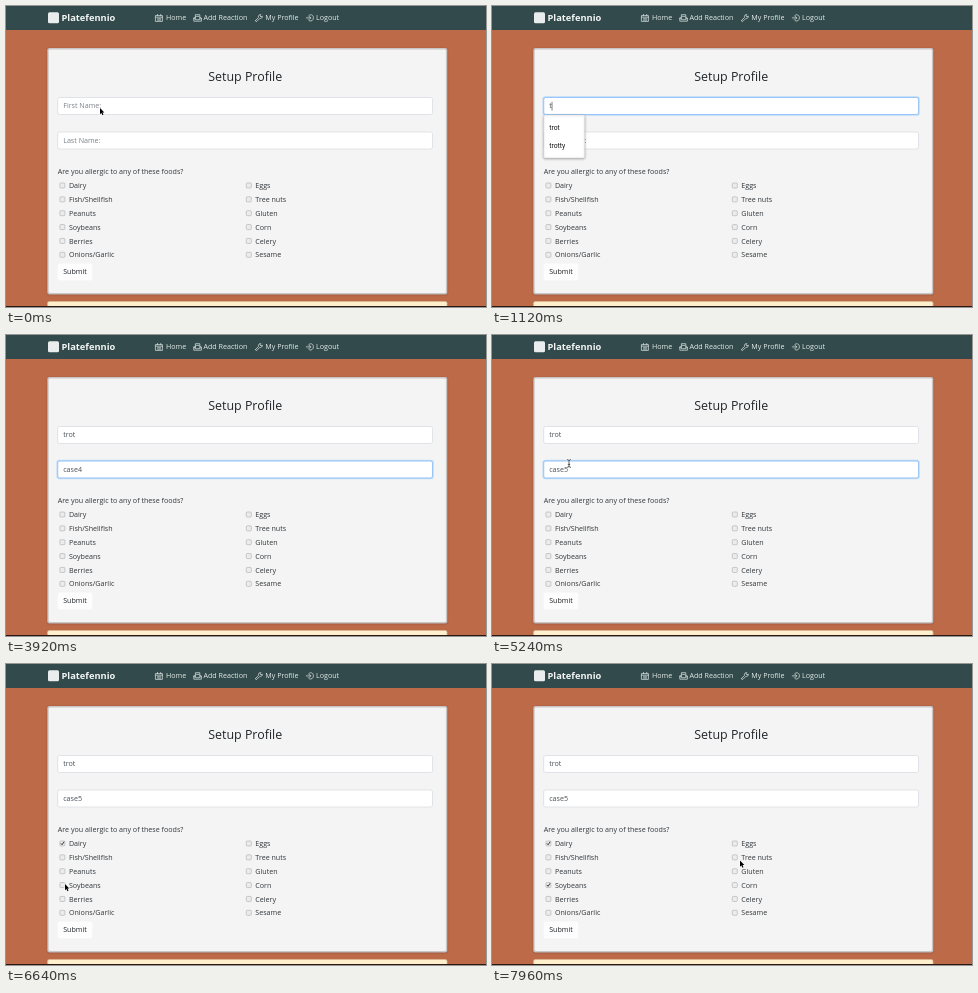
Animation, 480 px wide and 301 px high, one loop 8 s. Source, as an HTML page with a canvas:

```html
<!DOCTYPE html>
<html lang="en">
<head>
<meta charset="utf-8">
<title>Setup Profile</title>
<style>
  html, body { margin: 0; width: 100%; height: 100%; overflow: hidden; background: #bd6a48; }
  canvas { display: block; width: 480px; height: 301px; }
</style>
</head>
<body>
<canvas id="stage"></canvas>
<script>
const W = 480, H = 301, LOOP = 8000, STEP = 40;
const SANS = '"Open Sans", sans-serif';
const canvas = document.getElementById('stage');
const ctx = canvas.getContext('2d');
const ratio = window.devicePixelRatio || 1;
canvas.width = W * ratio;
canvas.height = H * ratio;

const FOODS = [
  ['Dairy', 'Fish/Shellfish', 'Peanuts', 'Soybeans', 'Berries', 'Onions/Garlic'],
  ['Eggs', 'Tree nuts', 'Gluten', 'Corn', 'Celery', 'Sesame']
];
const CHECKED_AT = { Dairy: 5960, Soybeans: 7160 };

// [start time, value]
const FIRST_NAME = [[0, ''], [1080, 't'], [1200, 'tro'], [1320, 'trot']];
const LAST_NAME = [[0, ''], [2440, 'c'], [2520, 'ca'], [2640, 'cas'], [2720, 'case'],
  [3440, 'case4'], [4520, 'case5']];
const FIRST_CARET = [[0, false], [680, true], [1640, false]];
const LAST_CARET = [[0, false], [1640, true], [2120, false], [2440, true], [3160, false],
  [3440, true], [3920, false], [4360, true], [5000, false], [5480, true], [5920, false]];

// [time, x, y] of the pointer; hidden while typing
const POINTER = [
  [[0, 94, 102], [120, 94, 102], [280, 101, 101.5], [400, 101, 101.5], [480, 102, 101.5], [1080, 102, 101.5]],
  [[5160, 99, 107.5], [5240, 77, 128.5], [5400, 72, 146], [5560, 63, 166], [5760, 55.5, 179],
    [6240, 55.5, 179], [6440, 58, 198], [6640, 59, 220], [6800, 60, 225.5], [7040, 56, 220.5],
    [7400, 56, 220.5], [7600, 108, 217], [7800, 205, 203], [7960, 248, 196.5], [8000, 248, 196.5]]
];

const clamp = v => Math.max(0, Math.min(1, v));
const ramp = (t, from, to) => clamp((t - from) / (to - from));
const valueAt = (list, t) => list.filter(([start]) => start <= t).pop()[1];

function box(x, y, w, h, r, fill, stroke, line = 0.6) {
  ctx.beginPath();
  ctx.roundRect(x, y, w, h, r);
  if (fill) { ctx.fillStyle = fill; ctx.fill(); }
  if (stroke) { ctx.strokeStyle = stroke; ctx.lineWidth = line; ctx.stroke(); }
}

function text(str, x, y, { size = 7.13, color = '#32373b', weight = 400, font = SANS, align = 'left' } = {}) {
  ctx.font = `${weight} ${size}px ${font}`;
  ctx.fillStyle = color;
  ctx.textAlign = align;
  ctx.fillText(str, x, y);
  return ctx.measureText(str).width;
}

function path(d, x, y, color, line) {
  ctx.save();
  ctx.translate(x, y);
  ctx.strokeStyle = color;
  ctx.lineWidth = line;
  ctx.lineJoin = ctx.lineCap = 'round';
  ctx.stroke(new Path2D(d));
  ctx.restore();
}

function withShadow(color, blur, dy, draw) {
  ctx.save();
  ctx.shadowColor = color;
  ctx.shadowBlur = blur * ratio;
  ctx.shadowOffsetY = dy * ratio;
  draw();
  ctx.restore();
}

function drawNav() {
  ctx.fillStyle = '#324a4b';
  ctx.fillRect(0, 0, W, 24);
  box(42, 6.3, 11, 11, 1.5, '#e9eded');
  text('Platefennio', 55.5, 15.4, { size: 9.3, weight: 700, color: '#f3f5f5' });
  const items = [
    ['Home', 160, 149.5, 'M.3 1.4H6.9V7.2H.3ZM.3 3H6.9M2 .3V1.4M5.2 .3V1.4M2 4.6H5.2M2 5.9H5.2'],
    ['Add Reaction', 197.5, 187.5, 'M.3 4V7H7.9V4L6.3 3M.3 4L1.9 3M.3 4.2L2.6 5.5H5.6L7.9 4.2M1.9 4.5V.5H6.3V4.5M3 2.2H5.2'],
    ['My Profile', 259.3, 249, 'M.6 6.2L3.5 3.2C3 1.5 4.2 .2 5.8 .4L4.9 1.7L6 2.7L7.3 1.9C7.6 3.5 6.2 4.6 4.8 4.2L1.8 7.2C1 7.6 .2 6.9 .6 6.2'],
    ['Logout', 310, 300, 'M2.4 1.8C3.4 .2 6 0 7.1 2C8 4 7 6.6 4.8 6.8C3.7 6.9 2.8 6.4 2.3 5.6M.3 3.7H4.8M3.4 2.3L4.8 3.7L3.4 5.1']
  ];
  for (const [label, x, iconX, icon] of items) {
    path(icon, iconX, 8.2, '#d8dfdf', 0.75);
    text(label, x, 14.4, { color: '#e6ebeb' });
  }
}

function drawInput(y, placeholder, value, caret, focus) {
  if (focus > 0) {
    ctx.globalAlpha = focus;
    box(50.4, y - 1.3, 377.4, 19.6, 2.8, '#bfdcfb');
    ctx.globalAlpha = 1;
  }
  box(51.7, y, 374.8, 17, 1.9, '#fff', '#ced4da');
  if (focus > 0) {
    ctx.globalAlpha = focus;
    box(51.7, y, 374.8, 17, 1.9, null, '#80bdff', 0.7);
    ctx.globalAlpha = 1;
  }
  const width = value
    ? text(value, 57.2, y + 10.9, { color: '#495057' })
    : text(placeholder, 57.2, y + 10.9, { color: '#7b838a' }) * 0;
  if (caret) {
    ctx.fillStyle = '#30363b';
    ctx.fillRect(57.2 + width, y + 4.2, 0.6, 9);
  }
}

function drawSuggestions(y, items, alpha = 1) {
  if (alpha <= 0) return;
  ctx.globalAlpha = alpha;
  withShadow('rgba(0,0,0,.35)', 2.5, 0.7, () =>
    box(51.7, y, 41, items.length * 18 + 7, 1.5, '#fff', '#d2d2d2', 0.4));
  items.forEach((item, i) =>
    text(item, 57.2, y + 14.9 + i * 18, { size: 6.8, color: '#151515', font: 'Roboto, sans-serif' }));
  ctx.globalAlpha = 1;
}

function drawFoods(t) {
  FOODS.forEach((column, c) => column.forEach((food, row) => {
    const x = c ? 240.3 : 53.9, y = 177 + row * 13.86;
    box(x, y, 5, 5, 0.9, '#ececec', '#a6a6a6', 0.55);
    if (t >= CHECKED_AT[food]) path('M1.2 2.6L2.2 3.8L4 1', x, y, '#292929', 0.9);
    text(food, x + 9, y + 5.1);
  }));
}

function drawPointer(t) {
  const keys = POINTER.find(k => t >= k[0][0] && t < k[k.length - 1][0]);
  if (!keys) return;
  const i = keys.findIndex(k => k[0] > t);
  const [t0, x0, y0] = keys[i - 1], [t1, x1, y1] = keys[i];
  const p = ramp(t, t0, t1);
  const x = x0 + (x1 - x0) * p, y = y0 + (y1 - y0) * p;
  const overText = t >= 160 && ((y > 91 && y < 109) || (y > 126 && y < 143) || (y > 161 && y < 170));
  if (overText) {
    const beam = 'M-1.6 -3.8Q0 -3.8 0 -2.8Q0 -3.8 1.6 -3.8M0 -2.8V2.8M-1.6 3.8Q0 3.8 0 2.8Q0 3.8 1.6 3.8M-.8 .9H.8';
    path(beam, x, y, 'rgba(255,255,255,.8)', 1.5);
    path(beam, x, y, '#222', 0.7);
    return;
  }
  const arrow = 'M0 0V6.2L1.4 4.9L2.4 7.2L3.5 6.7L2.5 4.5H4.4Z';
  path(arrow, x, y, '#fff', 1.1);
  ctx.save();
  ctx.translate(x, y);
  ctx.fillStyle = '#000';
  ctx.fill(new Path2D(arrow));
  ctx.restore();
}

function draw(t) {
  ctx.setTransform(ratio, 0, 0, ratio, 0, 0);
  ctx.fillStyle = '#bd6a48';
  ctx.fillRect(0, 0, W, H);
  drawNav();

  withShadow('rgba(0,0,0,.25)', 2, 0.5, () => box(41.3, 42, 400, 246.4, 2.2, '#c9c6c5'));
  box(42.7, 43.4, 397.2, 243.6, 1.4, '#f4f4f4');
  box(41.3, 295.3, 400, 12, 2, '#e5cda9');
  box(42.2, 296, 398.2, 12, 1.4, '#fff0cd');
  ctx.fillStyle = '#2a1712';
  ctx.fillRect(0, 300, W, 1);

  text('Setup Profile', 239.2, 74.8, { size: 12.45, color: '#212529', align: 'center' });

  const firstFocus = ramp(t, 640, 720) * (1 - ramp(t, 1600, 1760));
  const lastFocus = ramp(t, 1600, 1760) * (1 - ramp(t, 5880, 6080));
  drawInput(91.5, 'First Name:', valueAt(FIRST_NAME, t), valueAt(FIRST_CARET, t), firstFocus);
  drawInput(126, 'Last Name:', valueAt(LAST_NAME, t), valueAt(LAST_CARET, t), lastFocus);

  text('Are you allergic to any of these foods?', 51.8, 168.2);
  drawFoods(t);
  box(51.7, 257.5, 34.6, 17, 1.9, '#fdfdfd');
  text('Submit', 69, 268.4, { align: 'center', color: '#212529' });

  if (t >= 720 && t < 1640) {
    const names = t < 1120 ? ['trot', 'trotty', 'demo', 'sample'] : ['trot', 'trotty'];
    drawSuggestions(109, names, 1 - ramp(t, 1440, 1600));
  }
  if (t >= 2440 && t < 3440) drawSuggestions(143.5, ['case4']);
  drawPointer(t);
}

function tick() {
  const t = performance.now() % LOOP;
  draw(Math.floor(t / STEP) * STEP);
  requestAnimationFrame(tick);
}
tick();
</script>
</body>
</html>
```
